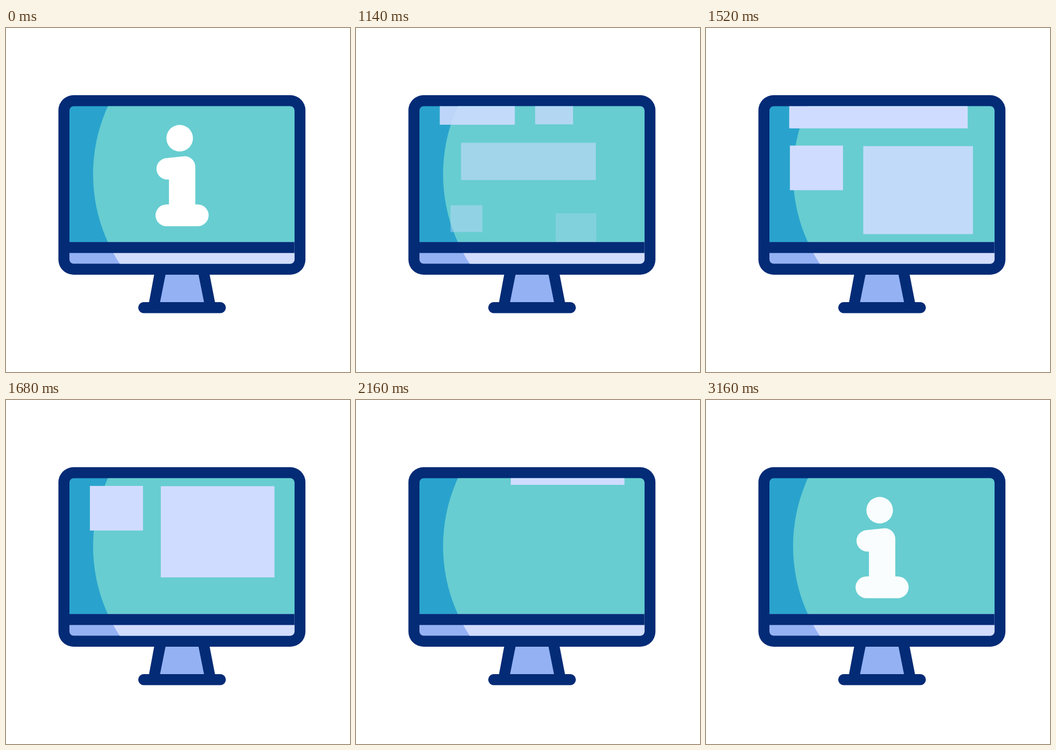
Write an HTML page that moves like this. It is 640 by 640 pixels and loops after 3620 ms.

```html
<!DOCTYPE html>
<html lang="en">
<head>
<meta charset="utf-8">
<title>Scrolling monitor</title>
<style>
  html, body { margin: 0; height: 100%; overflow: hidden; background: #fff; }
  svg { display: block; width: 100vw; height: 100vh; }
</style>
</head>
<body>
<svg viewBox="0 0 640 640">
  <clipPath id="glass"><rect x="118" y="145.5" width="418.7" height="293" rx="8"/></clipPath>
  <path fill="#042b76" d="M276 457H378.5L389.2 512H265.8Z"/>
  <path fill="#94b1f3" d="M297 458H358L368.5 510.5H286.5Z"/>
  <rect x="246" y="510" width="163" height="20.4" rx="10.2" fill="#042b76"/>
  <rect x="97.5" y="125" width="459.6" height="334" rx="28" fill="#042b76"/>
  <g clip-path="url(#glass)">
    <rect x="118" y="145" width="420" height="254" fill="#29a3cd"/>
    <circle cx="466.7" cy="272" r="304.7" fill="#67cdd1"/>
    <g id="info" fill="#fff">
      <circle cx="323.1" cy="205" r="24.7"/>
      <path d="M301 282H303.2V328.2H298.5a20.3 20.3 0 0 0 0 40.6H356.7a20.3 20.3 0 0 0 0-40.6H352.2V258.5a19.8 19.8 0 0 0-21.7-19.8L299 242a20 20 0 0 0 2 40Z"/>
    </g>
    <g id="page" fill="#d0dcff"></g>
    <rect x="118" y="398.2" width="420" height="42" fill="#94b1f3"/>
    <circle cx="466.7" cy="272" r="304.7" fill="#d2dcfd" style="clip-path: inset(146.5px 0 0 0)" id="bar"/>
    <rect x="118" y="398.2" width="420" height="20.4" fill="#042b76"/>
  </g>
</svg>
<script>
const LOOP = 3620, GROW = 600;
const $ = id => document.getElementById(id);
const clamp = v => Math.min(1, Math.max(0, v));

// The lower strip shows only the part of the circle below the screen.
$('bar').style.clipPath = 'inset(' + (398.2 - (272 - 304.7)) + 'px 0 0 0)';

// Anchor, rectangle around it, start of growth and of fade-in.
const blocks = [
  { ax: 165.7, ay: 203, x: -10, y: -34, w: 141, h: 68, grow: 576, fade: 610 },
  { ax: 410.3, ay: 201, x: -77, y: -35, w: 70.5, h: 70, grow: 541, fade: 700 },
  { ax: 320.8, ay: 279.3, x: -166, y: -12, w: 332, h: 92, grow: 797, fade: 805 },
  { ax: 205.5, ay: 379.3, x: -49.4, y: 12, w: 98.8, h: 83, grow: 885, fade: 900 },
  { ax: 418, ay: 406.8, x: -130, y: -15, w: 211.5, h: 169.7, grow: 1000, fade: 995 }
];

for (const b of blocks) {
  b.el = document.createElementNS('http://www.w3.org/2000/svg', 'rect');
  for (const [name, v] of [['x', b.x], ['y', b.y], ['width', b.w], ['height', b.h]])
    b.el.setAttribute(name, v);
  $('page').append(b.el);
}

const scroll = t => 257.5 * (1 - Math.cos(Math.PI * clamp((t - 680) / 2140)));

function infoOpacity(t) {
  const held = Math.floor(Math.min(t, 3160) / 79) * 79;
  return held < 1600 ? 1 - clamp(held / 800) : clamp((held - 2390) / 800);
}

function draw(t) {
  $('info').setAttribute('opacity', infoOpacity(t));
  for (const b of blocks) {
    const size = 1 - (1 - clamp((t - b.grow) / GROW)) ** 1.65;
    b.el.setAttribute('opacity', t < 2240 ? clamp((t - b.fade) / GROW) : 0);
    b.el.setAttribute('transform', `translate(${b.ax} ${b.ay - scroll(t)}) scale(${size})`);
  }
}

const start = performance.now();
function tick() {
  draw((performance.now() - start) % LOOP);
  requestAnimationFrame(tick);
}
tick();
</script>
</body>
</html>
```
